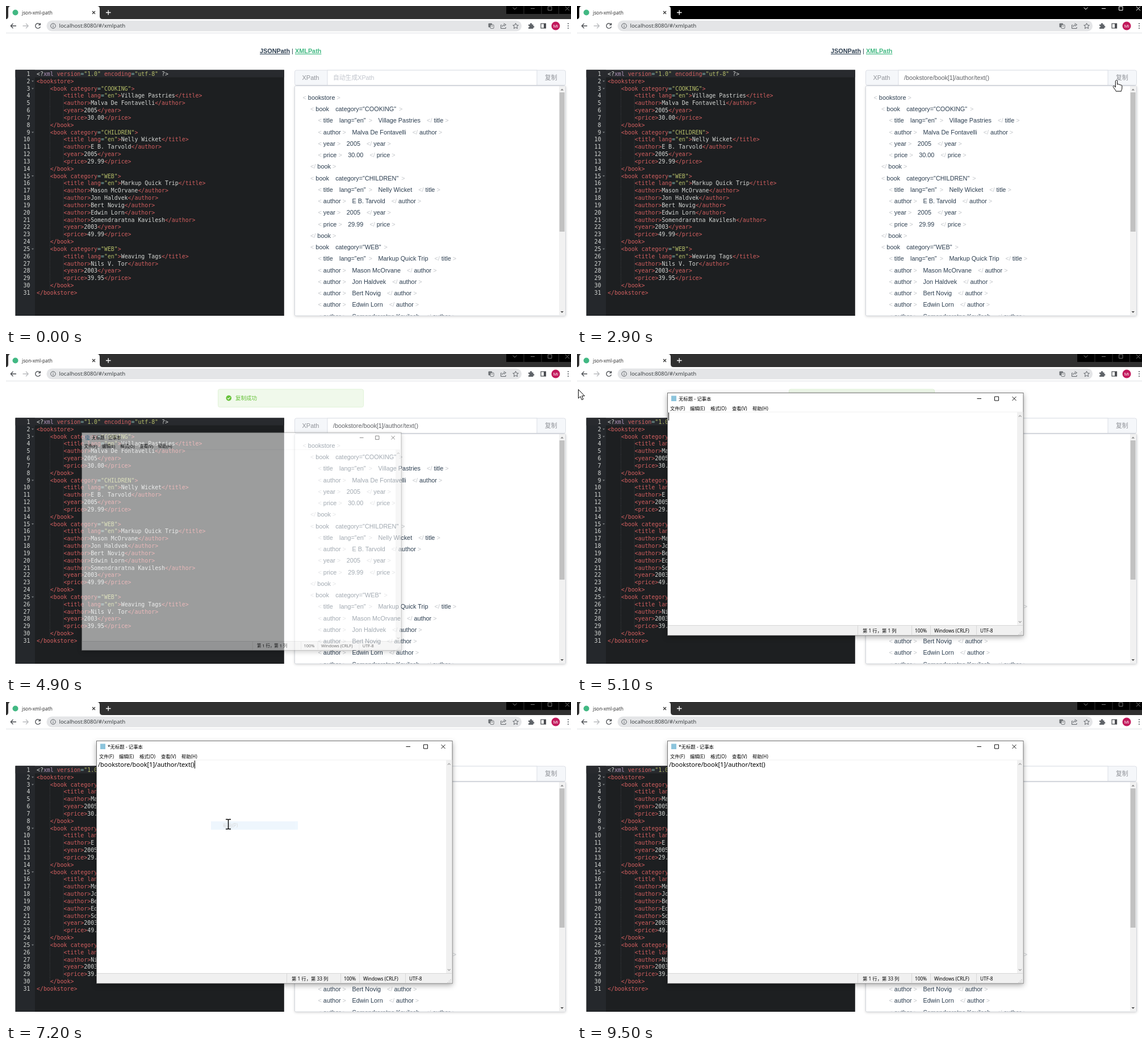
An HTML page that plays this animation: 995x563 px, repeating every 9.9 s.

```html
<!DOCTYPE html>
<html lang="zh">
<head>
<meta charset="utf-8">
<title>json-xml-path</title>
<style>
html, body { margin: 0; width: 100%; height: 100%; overflow: hidden; background: #fff; }
svg { display: block; width: 100%; height: 100%; }
text { white-space: pre; }
.ui { font-family: "Noto Sans", "Noto Sans CJK SC", sans-serif; }
.web { font-family: "Liberation Sans", "Noto Sans CJK SC", sans-serif; }
.code { font-family: "DejaVu Sans Mono", "Noto Sans Mono", monospace; }
</style>
</head>
<body>
<svg id="stage" viewBox="0 0 995 563">
  <defs>
    <clipPath id="treeClip"><rect x="509" y="141" width="465" height="403.5"/></clipPath>
    <clipPath id="pageClip"><rect y="48" width="995" height="515"/></clipPath>
  </defs>
</svg>
<script>
const NS = 'http://www.w3.org/2000/svg';
const LOOP = 9900, STEP = 100;
const stage = document.getElementById('stage');

function el(parent, tag, attrs = {}, content) {
  const node = document.createElementNS(NS, tag);
  for (const k in attrs) node.setAttribute(k, attrs[k]);
  if (content !== undefined) node.textContent = content;
  parent.appendChild(node);
  return node;
}
const set = (node, attrs) => { for (const k in attrs) node.setAttribute(k, attrs[k]); };
const group = (parent, attrs) => el(parent, 'g', attrs);
const rect = (p, x, y, width, height, fill, more) => el(p, 'rect', { x, y, width, height, fill, ...more });
const path = (p, d, stroke, more) => el(p, 'path', { d, stroke, fill: 'none', ...more });
const label = (p, x, y, str, size, fill, cls = 'ui', more) =>
  el(p, 'text', { x, y, 'font-size': size, fill, class: cls, ...more }, str);
const show = (node, on) => node.setAttribute('visibility', on ? 'visible' : 'hidden');
const clamp = v => Math.max(0, Math.min(1, v));
const easeOut = v => 1 - (1 - clamp(v)) ** 3;
const mix = (a, b, p) => a + (b - a) * p;

const books = [
  ['COOKING', 'Village Pastries', ['Malva De Fontavelli'], '2005', '30.00'],
  ['CHILDREN', 'Nelly Wicket', ['E B. Tarvold'], '2005', '29.99'],
  ['WEB', 'Markup Quick Trip',
    ['Mason McOrvane', 'Jon Haldvek', 'Bert Novig', 'Edwin Lorn', 'Somendraratna Kavilesh'], '2003', '49.99'],
  ['WEB', 'Weaving Tags', ['Nils V. Tor'], '2003', '39.95'],
];

// Flat list of document rows shared by the editor and the tree
const rows = [{ depth: 0, open: 'bookstore' }];
for (const [category, title, authors, year, price] of books) {
  const leaf = (name, value, attr) => rows.push({ depth: 2, open: name, close: name, value, attr });
  rows.push({ depth: 1, open: 'book', attr: ['category', category] });
  leaf('title', title, ['lang', 'en']);
  authors.forEach(a => leaf('author', a));
  leaf('year', year);
  leaf('price', price);
  rows.push({ depth: 1, close: 'book' });
}
rows.push({ depth: 0, close: 'bookstore' });

// ---- Browser frame ----
const page = group(stage);
rect(page, 0, 0, 995, 563, '#fff');
const strip = rect(page, 0, 0, 995, 23, '#303030');
const capBox = rect(page, 881, 0, 114, 14, '#000');
const capLines = path(page, 'M912 0V14M943 0V14M973.5 0V14', '#333');
const caps = path(page, 'M892.5 2.5L896 6L899.5 2.5M924 4.5H931M954.5 1H961V7.5H954.5ZM985 1L992 8M992 1L985 8', '#fff');
path(page, 'M0 23Q4 23 4 18V5Q4 0 9 0H160Q165 0 165 5V18Q165 23 170 23Z', 'none', { fill: '#fff' });
el(page, 'circle', { cx: 16.5, cy: 11.5, r: 5, fill: '#41b883' });
label(page, 28, 15, 'json-xml-path', 8.3, '#333');
path(page, 'M152 9L157 14M157 9L152 14', '#333', { 'stroke-width': 1.2 });
path(page, 'M176 11.5H184.5M180.2 7.2V15.8', '#fff', { 'stroke-width': 1.3 });
path(page, 'M0 47.5H995', '#dfe1e5');
rect(page, 71.5, 25.5, 836.5, 19, '#e4e5e7', { rx: 9.5 });
const icon = { 'stroke-width': 1.3 };
path(page, 'M18 35H8.5M12.5 30.8L8.3 35L12.5 39.2', '#4a4d51', icon);
path(page, 'M29.5 35H39M35 30.8L39.2 35L35 39.2', '#b9bbbe', icon);
path(page, 'M59.8 32.4A4.4 4.4 0 1 0 60.4 36.2M60.4 30V33.3H57', '#4a4d51', icon);
el(page, 'circle', { cx: 83, cy: 35, r: 4.3, fill: 'none', stroke: '#5f6368' });
path(page, 'M83 34.3V37.5M83 32.3V33.4', '#5f6368');
label(page, 93.5, 38.3, 'localhost:8080/#/xmlpath', 9.7, '#3c4043');
rect(page, 849.5, 30.5, 6.5, 7, '#6b6f73', { rx: 1 });
rect(page, 853, 33, 6, 6.5, '#fff', { rx: 1, stroke: '#6b6f73' });
path(page, 'M851 35L852.7 32L854 35M854.5 35H858M856 34V36L854.5 38M855.5 36L858 38', '#85898c', { 'stroke-width': .7 });
path(page, 'M873 33.5H871.5V39.5H880V37M873.5 37Q874 33 878 33M876.5 30.5L880.5 33L876.5 35.7', '#5f6368');
path(page, 'M897.5 30.2L899 33.6L902.3 33.9L899.8 36.2L900.6 39.7L897.5 37.8L894.4 39.7L895.2 36.2L892.7 33.9L896 33.6Z', '#5f6368');
path(page, 'M920 32.5H923Q922.5 30 924.5 30T926 32.5H928.5V35Q930.5 35 930.5 36.5T928.5 38V40H920V37.5Q922 37.5 922 36.2T920 35Z', 'none', { fill: '#5f6368' });
rect(page, 942, 31, 8.5, 8, 'none', { stroke: '#4a4d51', 'stroke-width': 1.2 });
rect(page, 947, 31, 3.5, 8, '#4a4d51');
el(page, 'circle', { cx: 968, cy: 35, r: 7.5, fill: '#c2185b' });
label(page, 968, 37.8, 'Mi', 7.5, '#fff', 'ui', { 'text-anchor': 'middle' });
[31, 35, 39].forEach(cy => el(page, 'circle', { cx: 990, cy, r: 1.1, fill: '#5f6368' }));

const link = { 'font-weight': 'bold', 'text-decoration': 'underline' };
label(page, 447, 83, 'JSONPath', 10.85, '#2c3e50', 'web', link);
label(page, 503, 83, '|', 10.85, '#2c3e50', 'web');
label(page, 509, 83, 'XMLPath', 10.85, '#42b983', 'web', link);

// ---- Editor ----
const RED = '#d25f5f', FG = '#d6d8d5', OP = '#8abeb7', STR = '#b5bd68';
const COL = 5.95, LINE = 12.83, MONO = 9.88;
rect(page, 16.6, 112.5, 473.2, 432.5, '#1d1f21');
rect(page, 16.6, 112.5, 34.4, 432.5, '#25282c');
rect(page, 16.6, 112.5, 473.2, 13, '#282a2e');

const attrParts = ([name, value]) => [[' ' + name, RED], ['=', OP], [`"${value}"`, STR]];
function codeParts({ open, close, value, attr }) {
  const parts = [];
  if (open) parts.push(['<' + open, RED], ...(attr ? attrParts(attr) : []), ['>', RED]);
  if (value) parts.push([value, FG]);
  if (close) parts.push([`</${close}>`, RED]);
  return parts;
}
function codeLine(i, depth, parts, fold) {
  const y = 123 + i * LINE;
  label(page, 42.5, y, i + 1, MONO, FG, 'code', { 'text-anchor': 'end' });
  if (fold) path(page, `M45 ${y - 4.5}H49L47 ${y - 2}Z`, 'none', { fill: '#777b7e' });
  for (let d = 1; d <= depth; d++)
    path(page, `M${53.5 + d * 4 * COL} ${y - 10}v${LINE}`, '#3b3e41', { 'stroke-dasharray': '1 1' });
  const line = label(page, 54 + depth * 4 * COL, y, '', MONO, FG, 'code');
  parts.forEach(([str, fill]) => el(line, 'tspan', { fill }, str));
}
codeLine(0, 0, [['<?', FG], ['xml', '#b294bb'], ...attrParts(['version', '1.0']),
  ...attrParts(['encoding', 'utf-8']), [' ?>', FG]]);
rows.forEach((r, i) => codeLine(i + 1, r.depth, codeParts(r), !r.close));

// ---- XPath bar ----
const bar = group(page);
rect(bar, 508.5, 113, 477, 26.5, '#f5f7fa', { rx: 3, stroke: '#dcdfe6' });
const input = rect(bar, 566, 113, 369, 26.5, '#fff', { stroke: '#dcdfe6' });
label(bar, 521.5, 129.7, 'XPath', 11, '#909399', 'web');
label(bar, 949, 129.8, '复制', 10.8, '#909399', 'web');
const query = label(bar, 576, 129.5, '', 10.8, '#606266', 'web');

// ---- Tree panel ----
rect(page, 508.5, 140.5, 477, 404.5, '#fff', { rx: 2, stroke: '#d3d6dc', style: 'filter:drop-shadow(0 1px 2px rgba(0,0,0,.16))' });
const tree = group(page, { 'clip-path': 'url(#treeClip)' });
const spans = [];
rows.forEach(({ depth, open, close, value, attr }, i) => {
  const y = 164.8 + i * 20.25;
  let x = 522.5 + depth * 13.5;
  const put = (str, fill, gap = 0) => {
    const node = label(tree, x += gap, y, str, 10.85, fill, 'web');
    x += node.getComputedTextLength();
    return node;
  };
  const INK = '#2c3e50', DIM = '#c3c6ca';
  if (open) {
    put('< ', DIM);
    put(open, INK);
    if (attr) put(`${attr[0]}="${attr[1]}"`, INK, 11.3);
    put(' >', DIM, attr ? 2 : 0);
  }
  if (value) {
    const back = rect(tree, x + 7, y - 10.8, 0, 14.4, '#2f75fb');
    const text = put(value, INK, 10.5);
    back.setAttribute('width', x + 3.5 - back.getAttribute('x'));
    spans.push({ back, text, x0: +back.getAttribute('x'), x1: x + 3.5, y0: y - 10.8, y1: y + 3.6 });
  }
  if (close) {
    put('</ ', DIM, value ? 11 : 0);
    put(close, INK);
    put(' >', DIM);
  }
});
rect(page, 974, 141, 11, 403.5, '#f1f1f1');
rect(page, 974.7, 152, 9, 245, '#c1c1c1');
path(page, 'M976.5 148.5H982L979.2 145.5Z', 'none', { fill: '#8a8a8a' });
path(page, 'M976.5 537H982L979.2 540Z', 'none', { fill: '#505050' });

// ---- Toast ----
const toastClip = group(stage, { 'clip-path': 'url(#pageClip)' });
const toast = group(toastClip);
rect(toast, 373.5, 62, 256, 31.5, '#f0f9eb', { rx: 3, stroke: '#e1f3d8' });
el(toast, 'circle', { cx: 392.3, cy: 77.6, r: 4.8, fill: '#67c23a' });
path(toast, 'M390 77.7L391.7 79.4L394.8 76', '#fff', { 'stroke-width': 1.1 });
label(toast, 404, 81, '复制成功', 9.5, '#67c23a', 'web');

// ---- Notepad ----
const pad = group(stage);
rect(pad, 159.5, 68.5, 626.5, 426.5, '#fff', { stroke: '#777', style: 'filter:drop-shadow(0 3px 5px rgba(0,0,0,.32))' });
rect(pad, 166, 73.5, 9, 9.5, '#8cc4dc');
const padTitle = label(pad, 179, 81.6, '', 8.4, '#000');
path(pad, 'M704.5 78.5H712M735.5 75H742.5V82H735.5ZM766.5 75L773.5 82M773.5 75L766.5 82', '#111');
['文件(F)', '编辑(E)', '格式(O)', '查看(V)', '帮助(H)'].forEach((s, i) =>
  label(pad, [164, 199, 235, 273, 309][i], 98.7, s, 8.3, '#000'));
path(pad, 'M160 102H785', '#f0f0f0');
const pasted = label(pad, 162, 114, '/bookstore/book[1]/author/text()', 11, '#000');
const caret = rect(pad, 161, 103, 1, 14, '#000');
rect(pad, 775, 102, 10.5, 375, '#f0f0f0');
path(pad, 'M777.8 110.5L780.2 108L782.6 110.5M777.8 470L780.2 472.5L782.6 470', '#a5a5a5', { 'stroke-width': 1.2 });
rect(pad, 160, 477, 625.5, 17.5, '#f0f0f0');
path(pad, 'M160 477.5H785.5M494.5 478V494M589.5 478V494M622.5 478V494M703.5 478V494', '#d7d7d7');
const status = label(pad, 503, 489.5, '', 8.3, '#000');
label(pad, 595, 489.5, '100%', 8.3, '#000');
label(pad, 629, 489.5, 'Windows (CRLF)', 8.3, '#000');
label(pad, 710, 489.5, 'UTF-8', 8.3, '#000');
path(pad, 'M783 488v1M783 490.5v1M783 493v1M780.5 490.5v1M780.5 493v1M778 493v1', '#aaa');

// ---- Context menu ----
const items = [
  [168, '撤消(U)', 1], [187.5, '剪切(T)'], [202.3, '复制(C)'], [217.2, '粘贴(P)', 1], [232, '删除(D)'],
  [251.8, '全选(A)'], [271.3, '从右到左的阅读顺序(R)', 1], [286, '显示 Unicode 控制字符(S)', 1],
  [301, '插入 Unicode 控制字符(I)', 1], [320.6, '关闭输入法(L)', 1], [335.5, '汉字重选(R)'], [355, '使用 Zelm 搜索...'],
];
const itemText = (p, [y, str, on]) => label(p, 382, y + 3.1, str, 8.2, on ? '#000' : '#6d6d6d');
const menu = group(stage);
rect(menu, 359.5, 159, 157, 205.5, '#f2f2f2', { stroke: '#b5b5b5', style: 'filter:drop-shadow(2px 2px 1px rgba(0,0,0,.45))' });
[178, 242, 261.5, 310.5, 345.5].forEach(y => path(menu, `M379 ${y}H514`, '#d0d0d0'));
items.forEach(it => itemText(menu, it));
path(menu, 'M505 298.5L507.5 301L505 303.5', '#222');
const picks = items.map(it => {
  const g = group(stage);
  rect(g, 361, it[0] - 7.3, 153, 14.8, it[2] ? '#91c9f7' : '#e2e2e2');
  itemText(g, it);
  return g;
});

// ---- Pointer ----
const pointer = group(stage);
const outline = { fill: '#fff', 'stroke-linejoin': 'round' };
const shapes = {
  arrow: path(pointer, 'M.4 .4V16L4 12.7L6.4 18.6L9 17.5L6.6 11.8H11.4Z', '#000', outline),
  hand: path(pointer, 'M-1.7 1.2C-1.7-.8 1.7-.8 1.7 1.2V7.2C1.9 6 4.6 6.2 4.7 7.6C5 6.8 7.4 7 7.5 8.4C8 7.8 9.8 8.2 9.8 9.6V13.5C9.8 16 8.4 17 8.4 19H-.8C-1.4 17-3.5 15-5.6 11.6C-6.6 9.8-4.6 8.8-3.3 10.2L-1.7 12Z', '#000', outline),
  beam: path(pointer, 'M-4.5-8.5H-1L0-7.5L1-8.5H4.5M0-7.5V7.5M-4.5 8.5H-1L0 7.5L1 8.5H4.5', '#000', { 'stroke-width': 1.4 }),
};

// Pointer trips: [time, x, y]
const trips = [
  [[300, 993, 56], [400, 937, 84], [500, 872, 157], [700, 725, 201], [900, 700, 201], [1200, 670, 220],
    [1600, 670, 220], [1800, 676, 200], [2100, 840, 157], [2300, 862, 128], [2500, 850, 127], [2600, 895, 128],
    [2900, 950, 131], [3700, 950, 131], [3800, 840, 190], [3900, 600, 350], [4000, 242, 545]],
  [[5100, 2, 62], [5200, 148, 70], [5500, 330, 140], [5700, 359, 158], [6200, 359, 158], [6500, 385, 222],
    [6600, 392, 227], [6800, 391.5, 215], [7400, 391.5, 215], [7500, 394, 213], [7800, 394, 213],
    [8100, 397, 220], [8200, 397, 220], [8400, 525, 217], [8700, 760, 200], [8900, 860, 150],
    [9000, 937, 90], [9200, 993.5, 55]],
];
function pointerAt(t) {
  for (const trip of trips)
    for (let i = 1; i < trip.length; i++) {
      const [t0, x0, y0] = trip[i - 1], [t1, x1, y1] = trip[i];
      if (t < t0 || t > t1) continue;
      const p = (t - t0) / (t1 - t0);
      return { x: mix(x0, x1, p), y: mix(y0, y1, p) };
    }
  return null;
}
const inside = (pt, x0, y0, x1, y1) => pt && pt.x >= x0 && pt.x <= x1 && pt.y >= y0 && pt.y <= y1;

function drawPage(t, pt) {
  const active = t >= 800 && t < 4800;
  strip.setAttribute('fill', active ? '#000' : '#303030');
  caps.setAttribute('stroke', active ? '#fff' : '#777');
  show(capBox, !active);
  show(capLines, !active);

  const field = t < 800 ? '' : t < 1600 ? 'title' : 'author';
  query.textContent = field ? `/bookstore/book[1]/${field}/text()` : '自动生成XPath';
  query.setAttribute('fill', field ? '#606266' : '#c0c4cc');
  input.setAttribute('stroke', inside(pt, 566, 113, 935, 140) ? '#c0c4cc' : '#dcdfe6');

  let hovered = false;
  for (const s of spans) {
    const on = !!inside(pt, s.x0, s.y0, s.x1, s.y1) && t < 4800;
    show(s.back, on);
    s.text.setAttribute('fill', on ? '#fff' : '#2c3e50');
    hovered = hovered || on;
  }

  const come = easeOut((t - 3100) / 400), leave = clamp((t - 5700) / 200);
  set(toast, { opacity: t < 3200 ? 0 : come * (1 - leave), transform: `translate(0 ${-32 * (1 - come) - 20 * leave})` });
  return hovered;
}

function drawPad(t) {
  const p = easeOut((t - 4900) / 200), k = mix(.898, 1, p);
  show(pad, t >= 4900);
  set(pad, { opacity: mix(.56, 1, p), transform: `translate(${mix(414.5, 472.5, p)} ${mix(329.5, 281.5, p)}) scale(${k}) translate(-472.5 -281.5)` });

  const typed = t >= 7000;
  padTitle.textContent = (typed ? '*' : '') + '无标题 - 记事本';
  status.textContent = `第 1 行，第 ${typed ? 33 : 1} 列`;
  show(pasted, typed);
  const blink = t >= 6000 && t < 7000 || t % 1000 < 500;
  show(caret, t >= 5000 && blink);
  set(caret, { x: typed ? 332 : 161 });
}

function drawMenu(t, pt) {
  const open = t >= 6000 && t < 7000;
  show(menu, open);
  menu.setAttribute('opacity', t < 6100 ? .6 : 1);
  picks.forEach((g, i) => {
    const y = items[i][0];
    const fading = t >= 7000 && t < 7300 && i === 3;
    const on = open && t >= 6300 && inside(pt, 361, y - 7.3, 514, y + 7.4);
    show(g, on || fading);
    g.setAttribute('opacity', fading ? mix(.85, .15, (t - 7000) / 200) : 1);
  });
  return open;
}

function draw(t) {
  const pt = pointerAt(t);
  const hovered = drawPage(t, pt);
  drawPad(t);
  const menuOpen = drawMenu(t, pt);

  const overPad = t >= 4900 && inside(pt, 159, 68, 786, 495);
  let kind = 'arrow';
  if (overPad) {
    if (!menuOpen && inside(pt, 160, 102, 775, 477)) kind = 'beam';
  } else if (hovered || inside(pt, 936, 113, 985, 140)) kind = 'hand';
  else if (inside(pt, 566, 113, 935, 140)) kind = 'beam';
  for (const k in shapes) show(shapes[k], pt && k === kind);
  if (pt) pointer.setAttribute('transform', `translate(${pt.x} ${pt.y})`);
}

const start = performance.now();
function tick() {
  const t = (performance.now() - start) % LOOP;
  draw(Math.floor(t / STEP) * STEP);
  requestAnimationFrame(tick);
}
tick();
</script>
</body>
</html>
```
